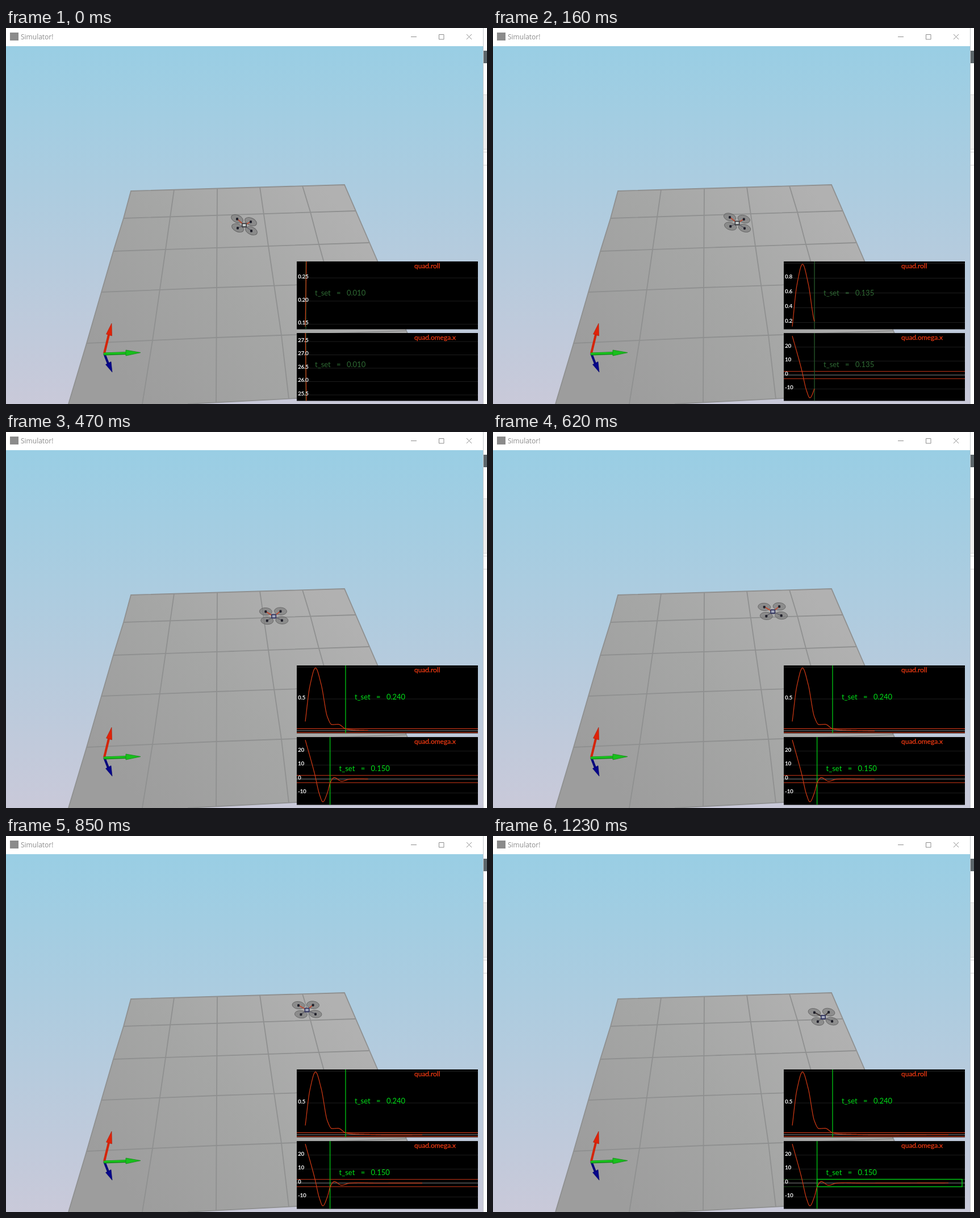
An HTML page for the animation above (1310 ms loop, 847 by 662 pixels).

```html
<!DOCTYPE html>
<html lang="en">
<head>
<meta charset="utf-8">
<title>Simulator</title>
<style>
  html, body { margin: 0; width: 100%; height: 100%; overflow: hidden; background: #fff; }
  svg { display: block; }
  text { font-family: Lato, sans-serif; white-space: pre; }
  .caption { font: 12px "Open Sans", sans-serif; fill: #8c8c8c; }
  .name { font-size: 12px; fill: #f03a12; stroke: #f03a12; stroke-width: .25px; }
  .tick { font-size: 10px; font-weight: 700; fill: #eee; letter-spacing: -.3px; }
  .tset { font-size: 13px; word-spacing: 7px; }
  .grid path { fill: none; stroke: #8f9090; stroke-width: 1.8px; }
  .line { fill: none; stroke: #d23a14; stroke-width: 1.2px; }
</style>
</head>
<body>
<svg width="847" height="662" viewBox="0 0 847 662">
  <defs>
    <linearGradient id="sky" x1="0" y1="0" x2="0" y2="1">
      <stop offset="0" stop-color="#99cee4"/>
      <stop offset="1" stop-color="#c9c9d9"/>
    </linearGradient>
    <linearGradient id="floor" gradientUnits="userSpaceOnUse" x1="190" y1="600" x2="560" y2="280">
      <stop offset="0" stop-color="#9d9d9d"/>
      <stop offset=".5" stop-color="#a5a6a5"/>
      <stop offset="1" stop-color="#b1b1b1"/>
    </linearGradient>
    <clipPath id="clip411"><rect x="512" y="411" width="319" height="119.5"/></clipPath>
    <clipPath id="clip537"><rect x="512" y="537" width="319" height="119.5"/></clipPath>
  </defs>

  <!-- window behind -->
  <rect width="847" height="662" fill="#fff"/>
  <rect x="841" y="117" width="6" height="97" fill="#eee"/>
  <path d="M841 117.500h6M841 213.500h6M841 218.500h6M841 241.500h6" stroke="#d4d4d4"/>
  <rect x="840" y="40" width="7" height="22" fill="#5d666b"/>
  <path d="M840.500 0V662" stroke="#c3c6ca"/>

  <!-- title bar -->
  <rect x="7" y="8" width="15" height="14" fill="#8b8b8b"/>
  <text class="caption" x="26" y="20">Simulator!</text>
  <path d="M713 15.500h10M762.500 11.500h8.500v8.500h-8.500zM811 11l9 9m0-9l-9 9" fill="none" stroke="#8d8d8d"/>

  <!-- scene -->
  <rect y="32" width="840" height="630" fill="url(#sky)"/>
  <path d="M220 287L596 276 654 410 705 533 753 642 511 652 320 662H110L142 555 168 465 189 393 207 335Z" fill="url(#floor)"/>
  <g class="grid">
    <path d="M110 662L142 555 168 465 189 393 207 335 220 287 596 276 654 410 705 533 753 642 511 652 320 662"/>
    <path d="M207 335L615 322M189 393L639 378M168 465L371 457 670 447M142 555L371 545 705 533"/>
    <path d="M296 284.500L281 390 258 550 240 662M372 282.500L371 457 370 660M447 280L462 384 485 541 498 653M522 278L536 324 551 381 562 420"/>
  </g>
  <g stroke-linejoin="round">
    <path d="M173 573L181 540" stroke="#d42408" stroke-width="4"/>
    <path d="M186 520L176.500 539 186.500 542Z" fill="#e02208" stroke="#a81c08" stroke-width=".6"/>
    <path d="M173 573L180 591" stroke="#06067c" stroke-width="4"/>
    <path d="M187 606L175.500 592.500 185 587.500Z" fill="#06068a" stroke="#040460" stroke-width=".6"/>
    <path d="M172 574L212 572.500" stroke="#128a18" stroke-width="5"/>
    <path d="M172 573.500L212 572" stroke="#18c41c" stroke-width="3"/>
    <path d="M237 571.500L211 567 211 577Z" fill="#18c01c" stroke="#128a18" stroke-width=".8"/>
  </g>

  <g id="drone"></g>
  <g id="plots"></g>
</svg>
<script>
const LOOP = 1310, X0 = 525, PX_PER_S = 304;
const LEFT = 512, RIGHT = 831;
const drone = document.getElementById('drone');
const plots = document.getElementById('plots');

// Monotone cubic through a few points.
function spline(xs, ys) {
  const d = xs.slice(1).map((x, i) => (ys[i + 1] - ys[i]) / (x - xs[i]));
  const m = ys.map((_, i) => {
    const a = d[i - 1] ?? d[i], b = d[i] ?? d[i - 1];
    return a * b <= 0 ? 0 : 2 * a * b / (a + b);
  });
  return x => {
    let i = 0;
    while (i < xs.length - 2 && x > xs[i + 1]) i++;
    const h = xs[i + 1] - xs[i], t = Math.min(1, (x - xs[i]) / h), u = 1 - t;
    return u * u * ((1 + 2 * t) * ys[i] + h * t * m[i])
         + t * t * ((3 - 2 * t) * ys[i + 1] - h * u * m[i + 1]);
  };
}

const roll = spline(
  [527, 535, 545, 555, 566, 574, 585, 598, 610, 640, 670, 802],
  [.145, .70, .99, .73, .215, .095, .1, .03, .012, .003, -.003, .002]);
const omega = spline(
  [527, 543, 552, 558, 566, 571, 578, 591, 604, 620, 650, 802],
  [28, 4.5, -11, -16.3, -9.8, -2.6, 1.1, -1.6, -.2, .2, -.1, .1]);

const STEPS = [0, 2, 4, 8, 11, 14, 16];
const track = (...ys) => spline(STEPS, ys);
const head = track(528, 566, 604, 672, 733, 787, 802);
const pose = {
  x: track(419.5, 430, 451.3, 492.7, 530, 561, 581.5),
  y: track(346.5, 342.7, 333, 315.5, 305.7, 308, 318.3),
  ux: track(12, 12.4, 12.8, 13.2, 12.8, 13, 12.6),
  uy: track(2.5, 1.7, 0, -.4, -.3, 0, -.2),
  vx: track(.5, .6, .7, 1.8, 2.2, 3, 3),
  tilt: track(24, 17, 2, 4, 6, 9, 13)
};

function drawDrone(k) {
  const p = {};
  for (const key in pose) p[key] = pose[key](k);
  const tips = [[-1, -1], [1, -1], [-1, 1], [1, 1]].map(([a, b]) =>
    [p.x + a * p.ux + b * p.vx, p.y + a * p.uy + b * 8, b]);
  const hubY = p.y + .8;
  const late = k > 14;
  const discs = tips.map(([x, y]) =>
    `<ellipse cx="${x}" cy="${y}" rx="11" ry="6.6" transform="rotate(${p.tilt} ${x} ${y})"
      fill="#777" fill-opacity=".62" stroke="#666" stroke-width=".9"/>`);
  const arms = tips.map(([x, y, b]) =>
    `<path d="M${x} ${y}L${p.x} ${hubY}" stroke="${b > 0 ? '#686870' : late ? '#3c3434' : '#bd4a32'}" stroke-width="1.8"/>`);
  const motors = tips.map(([x, y]) =>
    `<rect x="${x - 2}" y="${y - 2}" width="4" height="4.500" rx="1.3" fill="#20202a"/>`);
  return discs.join('') + arms.join('') + motors.join('') +
    `<rect x="${p.x - 4.5}" y="${hubY - 4}" width="9" height="8" rx="1" fill="${k > 3 ? '#33355e' : '#3c3c40'}"/>
     <rect x="${p.x - 2.8}" y="${hubY - 2.2}" width="5.600" height="4" fill="${k > 3 ? '#a6abc0' : '#c9d0d0'}"/>`;
}

const hline = (y, color, w = 1) =>
  `<path d="M${LEFT} ${y}H${RIGHT}" stroke="${color}" stroke-width="${w}"/>`;

// scale: [pixels per unit, reference value, its y, tick step, decimals]
function drawPlot(o, x) {
  const [s, ref, refY, step, dec] = o.scale;
  const bottom = o.top + 119.5;
  const Y = v => refY - (v - ref) * s;
  const now = (x - X0) / PX_PER_S;
  const at = Math.min(Math.round(now * 200) / 200, o.settle);
  const lineX = X0 + PX_PER_S * at;
  const done = now >= o.settle + .1, pass = now >= o.settle + .75;
  let out = `<rect x="${LEFT}" y="${o.top}" width="319" height="119.500"/><g clip-path="url(#clip${o.top})">`;

  const first = Math.ceil((ref - (bottom - refY) / s) / step);
  let labels = '';
  for (let i = first; Y(i * step) > o.top; i++) {
    const y = Y(i * step);
    out += hline(y, i ? '#1d1d1d' : '#858585');
    if (y > o.top + 12 && y < bottom - 6)
      labels += `<text class="tick" x="514" y="${y + .7}">${(i * step).toFixed(dec)}</text>`;
  }
  for (const v of [o.band, -o.band]) out += hline(Y(v), pass ? '#1c4a1c' : '#c23416', 1.2);

  out += `<path d="M${lineX} ${o.top}V${bottom}" stroke="${done ? '#00c814' : '#285a2c'}" stroke-width="1.3"/>`;
  let d = '';
  for (let px = 527; px <= Math.max(x, 529); px += .5)
    d += `${d ? 'L' : 'M'}${px} ${Y(o.fn(px)).toFixed(2)}`;
  out += `<path class="line" d="${d}"/>`;
  if (pass) {
    const y = Y(o.band);
    out += `<rect x="${lineX}" y="${y}" width="${826 - lineX}" height="${Y(-o.band) - y}" fill="none" stroke="#00c814" stroke-width="1.5"/>`;
  }
  return out + labels +
    `<text class="tset" x="${lineX + 16}" y="${o.top + 60}" fill="${done ? '#00e018' : '#2f6a34'}">t_set = ${at.toFixed(3)}</text>
     <text class="name" x="719" y="${o.top + 12}">${o.name}</text></g>`;
}

function rollScale(k) {
  if (k < 1) return [816, .25, 440, .05, 2];
  if (k < 3) return [130, 1, 414.5, .2, 1];
  if (k < 4) return [120, 1, 414.5, .2, 1];
  return k < 5 ? [112, 1, 415.3, .5, 1] : [111.5, 1, 414.3, .5, 1];
}

function omegaScale(k) {
  if (k < 1) return [47, 27.5, 552, .5, 1];
  return k < 2 ? [3.75, 0, 647, 10, 0] : [2.46, 0, 611, 10, 0];
}

let shown = -1;
function tick() {
  const t = performance.now() % LOOP;
  const k = Math.floor(Math.floor(t / 10) / 7.685);
  if (k !== shown) {
    shown = k;
    const x = head(k);
    drone.innerHTML = drawDrone(k);
    plots.innerHTML =
      drawPlot({ top: 411, name: 'quad.roll', fn: roll, scale: rollScale(k), band: .03, settle: .24 }, x) +
      drawPlot({ top: 537, name: 'quad.omega.x', fn: omega, scale: omegaScale(k), band: 2.65, settle: .15 }, x);
  }
  requestAnimationFrame(tick);
}
tick();
</script>
</body>
</html>
```
